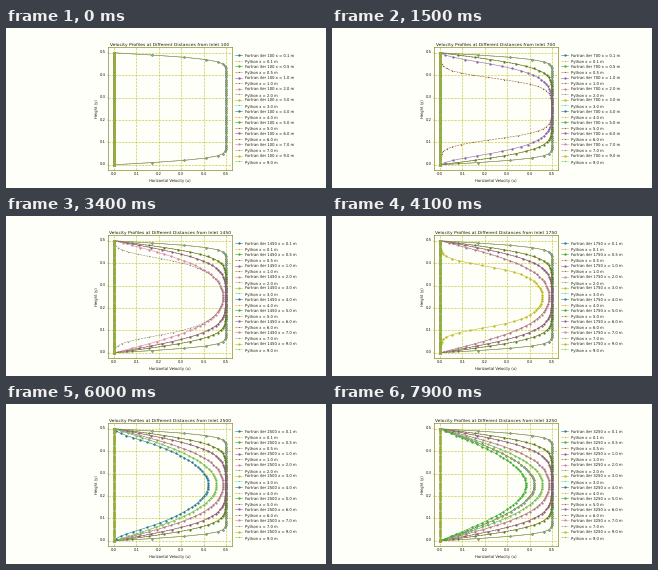
A matplotlib script for the animation above (8000 ms loop, 320 by 160 pixels).

```python
import numpy as np
import matplotlib.pyplot as plt
from matplotlib.animation import FuncAnimation

plt.rcParams.update({
    "font.family": "DejaVu Sans",
    "text.hinting": "none",
    "axes.edgecolor": "#77770a",
    "axes.linewidth": 1.6,
    "xtick.color": "#77770a",
    "ytick.color": "#77770a",
    "xtick.labelcolor": "#1c1c10",
    "ytick.labelcolor": "#1c1c10",
    "text.color": "#1c1c10",
    "axes.labelcolor": "#1c1c10",
})

WIDTH, HEIGHT = 320, 160
FRAMES, INTERVAL = 80, 100
PAPER = "#fffffa"
INLET, GAP = 0.5, 0.5
STATIONS = [0.1, 0.5, 1, 2, 3, 4, 5, 6, 7, 9]
COLORS = ["#28788f", "#d6a01e", "#38ae2c", "#a94a2c", "#8d62ad",
          "#8c6033", "#d583ae", "#8c8470", "#bdbb1e", "#2fcdb0"]
SOLVERS = [  # marker, line style, marker size, front delay per metre
    ("o", "-", 5, 421),
    ("x", "--", 3.2, 533),
]

y = np.linspace(0, GAP, 51)
radius = np.abs(y - GAP / 2) / (GAP / 2)


def steady_profile(x):
    """Uniform inlet flow slowed by friction at both walls."""
    n = np.arange(1, 80, 2)[:, None]
    modes = 4 / (n * np.pi) * np.sin(n * np.pi * y / GAP) * np.exp(-0.1 * x * n**2)
    return INLET * modes.sum(axis=0)


def developed(x, delay, iteration):
    """Share of the steady flow reached: the front fills from the core outwards."""
    front = (iteration - delay * x**1.2) / (300 * min(1, x))
    return 1 / (1 + np.exp(np.clip((radius - front) / 0.07, -50, 50)))


def iteration_at(frame):
    # every fifth tick holds the previous picture
    return 100 + 50 * (frame - (frame + 3) // 5)


fig = plt.figure(figsize=(12, 6), dpi=WIDTH / 12, facecolor=PAPER)

ax = fig.add_axes([102.4 / WIDTH, 0.11, 123.2 / WIDTH, 0.77], facecolor=PAPER)
ax.set(xlim=(-0.025, 0.525), ylim=(-0.025, 0.525),
       xticks=np.arange(6) / 10, yticks=np.arange(6) / 10,
       xlabel="Horizontal Velocity (u)", ylabel="Height (y)")
ax.grid(True, color="#c6c63c", lw=1.7, ls="--")
ax.set_axisbelow(True)
title = ax.set_title("", fontsize=12)

page = fig.add_axes([0, 0, 1, 1])
page.set(xlim=(0, WIDTH), ylim=(HEIGHT, 0))
page.axis("off")

curves, captions = [], []
for i, x in enumerate(STATIONS):
    for j, (marker, dash, size, delay) in enumerate(SOLVERS):
        row = 2 * i + j
        color = "#56c92a" if row == 19 else COLORS[row % 10]
        style = dict(color=color, ls=dash, lw=1.5, marker=marker, ms=size)
        line, = ax.plot([], [], **style)
        curves.append((line, x, delay, steady_profile(x)))

        level = 27.2 + 5.58 * row
        page.plot([228.9, 236.3], [level] * 2, color=color, ls=dash, lw=1.5)
        page.plot([232.6], [level], **style)
        text = page.text(239.3, level, "", fontsize=10, va="center_baseline")
        captions.append((text, x, j == 0))


def update(frame):
    iteration = iteration_at(frame)
    title.set_text(f"Velocity Profiles at Different Distances from Inlet {iteration}")
    for line, x, delay, steady in curves:
        line.set_data(steady * developed(x, delay, iteration), y)
    for text, x, is_fortran in captions:
        solver = f"Fortran iter {iteration}" if is_fortran else "Python"
        text.set_text(f"{solver} x = {x:.1f} m")
    return [title] + [c[0] for c in curves] + [c[0] for c in captions]


anim = FuncAnimation(fig, update, frames=FRAMES, interval=INTERVAL,
                     init_func=lambda: update(0), repeat=True, repeat_delay=0)
plt.show()
```
